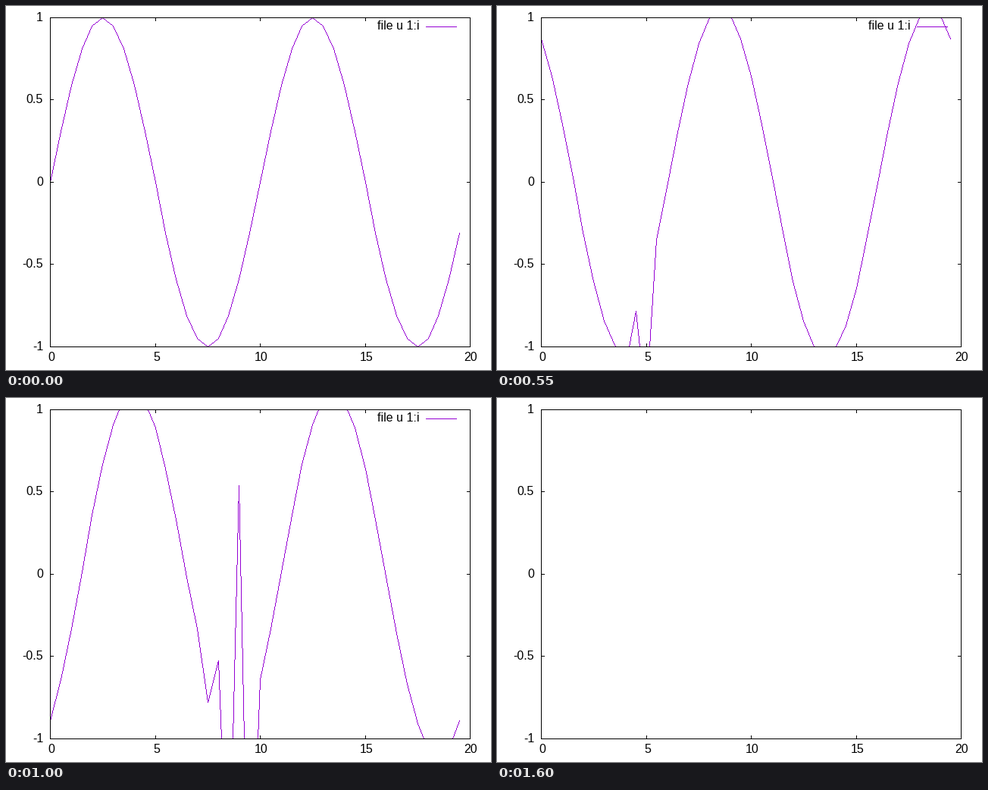
Animation of 640x480 px, one loop 1750 ms. Source, as a matplotlib script:

```python
import numpy as np
import matplotlib.pyplot as plt
from matplotlib.animation import FuncAnimation

W, H, DPI = 640, 480, 80
LEFT, RIGHT, TOP, BOTTOM = 58, 612, 15, 449  # plot frame in pixels
TICK = 4
FONT = 16                                    # text size in pixels
PURPLE = (0x94, 0x00, 0xD3, 255)
BLACK = (0, 0, 0, 255)

POINTS, DX, COURANT = 40, 0.5, 1.1
STEPS, FRAMES = 32, 35                       # the last frames hold an empty plot

plt.rcParams["font.family"] = "Liberation Sans"


def px(x):
    return int(LEFT + np.floor((RIGHT - LEFT) * x / 20 + 0.5))


def py(y):
    return int(BOTTOM - np.floor((BOTTOM - TOP) * (y + 1) / 2 + 0.5))


def advect():
    """Upwind advection with an unstable Courant number, ends tied together."""
    u = np.sin(2 * np.pi * x / 10)
    states = [u]
    for _ in range(STEPS - 1):
        new = u.copy()
        new[1:] = u[1:] - COURANT * (u[1:] - u[:-1])
        new[0] = new[-1]
        u = new
        states.append(u)
    return states


def stroke(canvas, x0, y0, x1, y1, color):
    """A hard-edged line, one pixel wide."""
    n = max(abs(x1 - x0), abs(y1 - y0), 1)
    t = np.arange(n + 1) / n
    cols = np.floor(x0 + (x1 - x0) * t + 0.5).astype(int)
    rows = np.floor(y0 + (y1 - y0) * t + 0.5).astype(int)
    canvas[rows, cols] = color


def clip(xa, ya, xb, yb):
    """Move point a along the segment to the border if it lies outside."""
    if abs(ya) <= 1:
        return xa, ya
    edge = np.sign(ya)
    return xa + (xb - xa) * (edge - ya) / (yb - ya), edge


def draw_curve(canvas, u):
    for xa, ya, xb, yb in zip(x, u, x[1:], u[1:]):
        if abs(ya) > 1 and abs(yb) > 1:      # wholly outside: not drawn
            continue
        a, b = clip(xa, ya, xb, yb), clip(xb, yb, xa, ya)
        stroke(canvas, px(a[0]), py(a[1]), px(b[0]), py(b[1]), PURPLE)


def draw_frame(canvas):
    for col in (LEFT, RIGHT):
        stroke(canvas, col, TOP, col, BOTTOM, BLACK)
    for row in (TOP, BOTTOM):
        stroke(canvas, LEFT, row, RIGHT, row, BLACK)
    for v in (5, 10, 15):
        stroke(canvas, px(v), TOP, px(v), TOP + TICK, BLACK)
        stroke(canvas, px(v), BOTTOM - TICK, px(v), BOTTOM, BLACK)
    for v in (-0.5, 0, 0.5):
        stroke(canvas, LEFT, py(v), LEFT + TICK, py(v), BLACK)
        stroke(canvas, RIGHT - TICK, py(v), RIGHT, py(v), BLACK)


def advance(s):
    return FONT * sum({".": 0.278, "-": 0.333}.get(c, 0.556) for c in s)


def label(left, base, s):
    return ax.text(left, base, s, fontsize=FONT * 72 / DPI, color="black",
                   ha="left", va="baseline", zorder=1)


x = np.arange(POINTS) * DX
states = advect()

fig = plt.figure(figsize=(W / DPI, H / DPI), dpi=DPI, facecolor="white")
ax = fig.add_axes([0, 0, 1, 1])
ax.set_axis_off()

# Lines lie on a transparent layer above the text
layer = ax.imshow(np.zeros((H, W, 4), np.uint8), extent=(0, W, H, 0),
                  aspect="auto", interpolation="nearest", zorder=2)

for v in (0, 5, 10, 15, 20):
    s = str(v)
    label(px(v) + 1.5 - advance(s) / 2, 468, s)
for v in (-1, -0.5, 0, 0.5, 1):
    s = f"{v:g}"
    label(49 - advance(s), py(v) + 5, s)
key = label(490, 31, "file u 1:i")


def update(n):
    canvas = np.zeros((H, W, 4), np.uint8)
    shown = n < STEPS
    if shown:
        stroke(canvas, 554, 27, 594, 27, PURPLE)
        draw_curve(canvas, states[n])
    draw_frame(canvas)
    layer.set_data(canvas)
    key.set_visible(shown)
    return layer, key


anim = FuncAnimation(fig, update, frames=FRAMES, interval=50, repeat=True,
                     repeat_delay=0, blit=False)
plt.show()
```
